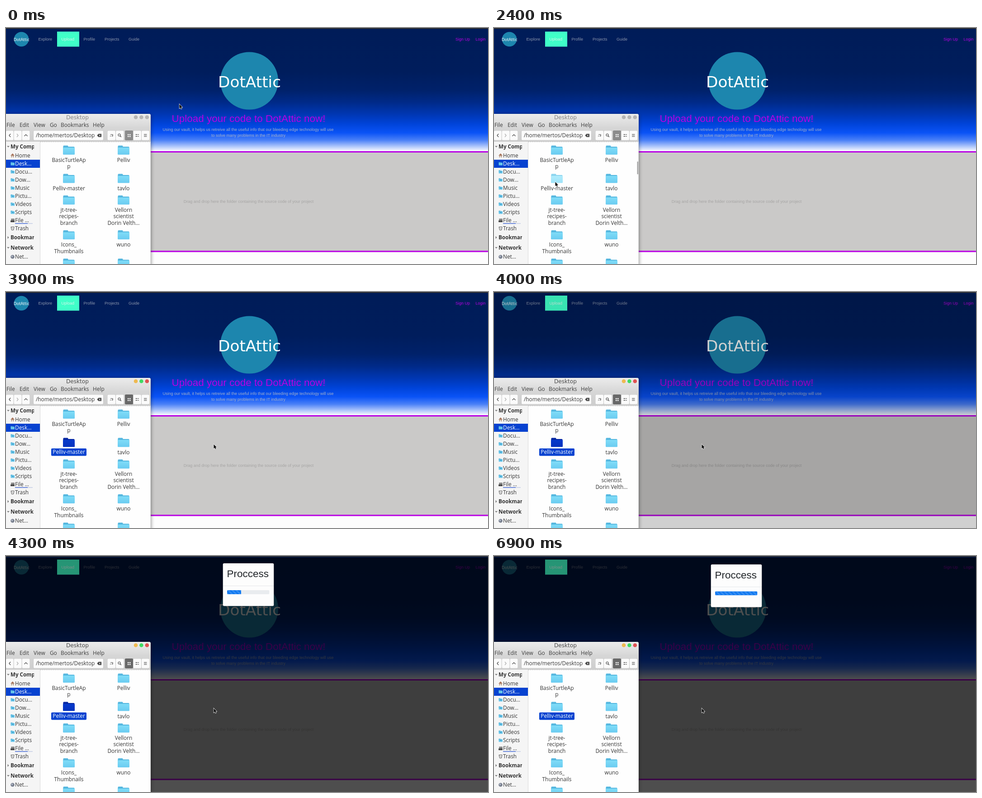
Recreate the animation shown at these times as an HTML page with a canvas. Size 1066x525 px, loop 7 s.

```html
<!DOCTYPE html>
<html lang="en">
<head>
<meta charset="utf-8">
<title>Folder upload</title>
<style>
  html, body { margin: 0; width: 100%; height: 100%; overflow: hidden; }
  canvas { display: block; }
</style>
</head>
<body>
<canvas id="stage" width="1066" height="525"></canvas>
<script>
const ctx = document.getElementById('stage').getContext('2d');
const LOOP = 7000, STEP = 100;
const WEB = '"Liberation Sans", Arial, sans-serif';
const UI = '"Open Sans", sans-serif';
const TITLE = '"DejaVu Sans", sans-serif';
const BODY_FONT = `9px ${WEB}`, HEADING_FONT = `22.5px ${WEB}`, UI_FONT = `11.85px ${UI}`;
const PURPLE = '#b900e4', BLUE = '#0742d0', LOGO = '#1d86ae';

// Linear interpolation through [time, value] pairs.
function track(t, keys) {
  if (t <= keys[0][0]) return keys[0][1];
  for (let i = 1; i < keys.length; i++) {
    const [t0, a] = keys[i - 1], [t1, b] = keys[i];
    if (t <= t1) return a + (b - a) * (t - t0) / (t1 - t0);
  }
  return keys[keys.length - 1][1];
}

function rect(x, y, w, h, color, r = 0) {
  ctx.fillStyle = color;
  ctx.beginPath();
  ctx.roundRect(x, y, w, h, r);
  ctx.fill();
}

function circle(x, y, r, color) {
  ctx.fillStyle = color;
  ctx.beginPath();
  ctx.arc(x, y, r, 0, Math.PI * 2);
  ctx.fill();
}

function poly(points, color, stroke) {
  ctx.beginPath();
  points.forEach(([x, y]) => ctx.lineTo(x, y));
  ctx.closePath();
  if (stroke) {
    ctx.strokeStyle = stroke;
    ctx.lineWidth = 1.4;
    ctx.stroke();
  }
  ctx.fillStyle = color;
  ctx.fill();
}

function line(points, color, width = 1) {
  ctx.beginPath();
  points.forEach(([x, y]) => ctx.lineTo(x, y));
  ctx.strokeStyle = color;
  ctx.lineWidth = width;
  ctx.stroke();
}

function text(str, x, y, font, color, align = 'left') {
  ctx.font = font;
  ctx.fillStyle = color;
  ctx.textAlign = align;
  ctx.fillText(str, x, y);
}

function vertical(y0, y1, stops) {
  const g = ctx.createLinearGradient(0, y0, 0, y1);
  stops.forEach(([at, color]) => g.addColorStop(at, color));
  return g;
}

function logo(x, y, r, size, baseline) {
  circle(x, y, r, LOGO);
  text('DotAttic', x + 0.5, baseline, `${size}px ${TITLE}`, '#fff', 'center');
}

const sky = vertical(2, 274, [
  [0, '#001c58'], [0.35, '#001d5c'], [0.5, '#00216a'], [0.6, '#002a88'], [0.7, '#0037b4'],
  [0.78, '#0044da'], [0.85, '#0a53f6'], [0.91, '#4a80f7'], [1, '#fafbfe'],
]);

function drawPage() {
  rect(0, 0, 1066, 525, '#fdfdfd');
  rect(0, 0, 1066, 274, sky);
  rect(0, 0, 1066, 2, '#303134');
  rect(0, 274, 1066, 224.5, PURPLE);
  rect(0, 277, 1066, 218.5, '#cac9c8');

  logo(34, 25, 16.3, 8.6, 28.5);
  rect(113, 8, 49, 33.5, '#40ffc8');
  [['Explore', 71.5], ['Upload', 122.5], ['Profile', 171.5], ['Projects', 218], ['Guide', 271]]
    .forEach(([label, x]) => text(label, x, 28, BODY_FONT, label === 'Upload' ? '#d2f5ea' : '#8b95ac'));
  text('Sign Up', 994, 28, BODY_FONT, PURPLE);
  text('Login', 1060.5, 28, BODY_FONT, PURPLE, 'right');

  logo(538, 117.5, 64, 34.3, 132);
  text('Upload your code to DotAttic now!', 366.4, 209, HEADING_FONT, PURPLE);
  text('Using our vault, it helps us retreive all the useful info that our bleeding edge technology will use',
    535.5, 228.5, BODY_FONT, '#a4b0c8', 'center');
  text('to solve many problems in the IT industry', 536, 242, BODY_FONT, '#a4b0c8', 'center');
  text('Drag and drop here the folder containing the source code of your project',
    536.5, 389, BODY_FONT, '#a6a5a4', 'center');
}

function drawBackdrop(t) {
  const alpha = track(t, [[3900, 0], [4000, 0.18], [4100, 0.46], [4200, 0.62], [4300, 0.69]]);
  if (!alpha) return;
  ctx.fillStyle = `rgba(0,0,0,${alpha})`;
  ctx.beginPath();
  ctx.rect(0, 3, 1066, 522);
  ctx.rect(113, 8, 49, 33.5);
  ctx.fill('evenodd');
  rect(113, 8, 49, 33.5, `rgba(0,0,0,${alpha * 0.6})`);
}

function drawModal(t) {
  if (t < 4200) return;
  ctx.save();
  ctx.globalAlpha = track(t, [[4200, 0.5], [4300, 1]]);
  ctx.translate(480, track(t, [[4200, 8], [4300, 16.5], [4400, 19]]));
  rect(-0.5, -0.5, 113, 95.5, '#8d8d90', 3);
  rect(0, 0, 112, 94.5, '#fdfdfd', 2.5);
  text('Proccess', 8.5, 30.5, HEADING_FONT, '#212529');
  rect(0, 49.5, 112, 0.8, '#dcdfe3');

  ctx.beginPath();
  ctx.roundRect(9, 59.5, 93.5, 9, 2.2);
  ctx.clip();
  rect(9, 59.5, 93.5, 9, '#e9ecef');
  const width = track(t, [[4600, 31], [5900, 93.5]]);
  rect(9, 59.5, width, 9, '#0f78f0');
  ctx.beginPath();
  ctx.rect(9, 59.5, width, 9);
  ctx.clip();
  for (let x = 0; x < 105; x += 9)
    poly([[x, 59.5], [x + 4.5, 59.5], [x + 13.5, 68.5], [x + 9, 68.5]], '#338cf3');
  ctx.restore();
}

function folder(x, y, tone = 'normal') {
  const [back, top, bottom] = {
    normal: ['#55b7df', '#7fdcf8', '#6acbf0'],
    hover: ['#8cd4ee', '#b0ecfc', '#9ee2f8'],
    selected: ['#0527a2', '#0639cc', '#0531bd'],
  }[tone];
  rect(x - 12.5, y + 0.5, 11, 8, back, 1.5);
  rect(x - 12.5, y + 3, 25, 10, back, 1.5);
  rect(x - 13, y + 5, 26, 15.8, vertical(y + 5, y + 21, [[0, top], [1, bottom]]), 1.5);
}

const FOLDERS = [
  [139, 261, 'BasicTurtleAp', 'p'],
  [260, 261, 'Pelliv'],
  [139, 324, 'Pelliv-master'],
  [260, 324, 'tavlo'],
  [139, 372, 'jt-tree-', 'recipes-', 'branch'],
  [260, 372, 'Vellorn', 'scientist', 'Dorin Velth…'],
  [139, 449.5, 'Icons_', 'Thumbnails'],
  [260, 449.5, 'wuno'],
  [139, 512.5],
  [260, 512.5],
];
const PICKED = FOLDERS[2];

function selectedLabel(x, y) {
  rect(x - 39, y, 78, 16.5, BLUE, 2);
  text(PICKED[2], x, y + 12.3, UI_FONT, '#fff', 'center');
}

function drawFolders(t, cursor) {
  const selected = t >= 2500;
  for (const item of FOLDERS) {
    const [x, y, ...lines] = item;
    const isPicked = item === PICKED && selected;
    const hover = !selected && Math.abs(cursor.x - x) < 13 && cursor.y > y && cursor.y < y + 21;
    folder(x, y, isPicked && t < 6900 ? 'selected' : hover ? 'hover' : 'normal');
    if (isPicked) selectedLabel(x, 348);
    else lines.forEach((str, i) =>
      text(str, x, y + 36.5 + i * 14.7, UI_FONT, '#333', 'center'));
  }
}

const PLACES = [
  ['Home', 284], ['Desk…', 302], ['Docu…', 320], ['Dow…', 338], ['Music', 356], ['Pictu…', 374],
  ['Videos', 392], ['Scripts', 410], ['File …', 428], ['Trash', 446], ['Net…', 509],
];

function placeIcon(name, y) {
  if (name === 'Home') {
    poly([[10, y], [14.5, y - 5], [19, y]], '#a66f55');
    rect(11.5, y - 1, 6, 5, '#b79a86');
    rect(13.5, y + 1, 2, 3, '#fff');
  } else if (name === 'File …') {
    rect(11, y - 4, 8, 4, '#8b8b8b', 1);
    rect(10, y, 9, 4, '#4b4b4b', 1);
  } else if (name === 'Trash') {
    line([[11, y - 3.5], [18, y - 3.5], [16.5, y + 3.5], [12.5, y + 3.5], [11, y - 3.5]], '#555');
    line([[13, y - 1.5], [16, y + 1.5]], '#555');
  } else if (name === 'Net…') {
    circle(14.5, y, 4.3, '#7b8291');
    circle(13.5, y - 1, 1.8, '#b4bccb');
  } else {
    rect(10.5, y - 3.5, 4, 3, '#45a5cf');
    rect(10.5, y - 2.5, 8.5, 6, '#67c5ea', 0.5);
    if (name !== 'Desk…') rect(13, y - 0.5, 3.5, 1.5, '#3a93bb');
  }
}

function drawSidebar() {
  rect(0, 253, 75, 272, '#f5f5f5');
  rect(75, 253, 1, 272, '#d9d9d9');
  rect(0, 293, 75, 18, BLUE);
  for (const [name, y] of PLACES) {
    placeIcon(name, y);
    text(name, 20, y + 4.3, UI_FONT, name === 'Desk…' ? '#fff' : '#333');
  }
  rect(20, 434.3, 39, 1.2, '#b9c4e2');
  rect(20, 434.3, 28, 1.2, '#2c55d0');

  ctx.save();
  ctx.beginPath();
  ctx.rect(0, 253, 62, 272);
  ctx.clip();
  [['My Computer', 264], ['Bookmarks', 466], ['Network', 489]].forEach(([name, y]) => {
    text(name, 10, y + 4.3, `bold 11.6px ${UI}`, '#333');
    poly(name === 'Bookmarks'
      ? [[3.5, y - 3], [6.5, y], [3.5, y + 3]]
      : [[2, y - 1.5], [8, y - 1.5], [5, y + 1.5]], '#777');
  });
  ctx.restore();
}

function drawToolbar(focused) {
  [[0, 16.5], [17.5, 17], [35.5, 17], [61, 154], [224.5, 17.5], [243, 17.5], [281.5, 17.5], [300, 17]]
    .forEach(([x, w]) => {
      rect(x - 0.5, 228, w + 1, 22, '#c3c3c3', 2.5);
      rect(x, 228.5, w, 21, '#fbfbfb', 2);
    });
  rect(263, 228, 18, 22, focused ? '#686868' : '#8c8c8c', 2);
  line([[10, 235.5], [7, 239], [10, 242.5]], '#444', 1.2);
  line([[24, 235.5], [27, 239], [24, 242.5]], '#aaa', 1.2);
  line([[40.5, 240.5], [44, 237], [47.5, 240.5]], '#444', 1.2);
  text('/home/mertos/Desktop', 66, 243, UI_FONT, '#383838');

  poly([[201.5, 239], [204.5, 235.5], [211, 235.5], [211, 242.5], [204.5, 242.5]], '#3d3d3d');
  line([[205.5, 237.3], [209, 240.8]], '#fff');
  line([[209, 237.3], [205.5, 240.8]], '#fff');

  line([[230, 240.5], [232, 240.5]], '#444', 1.2);
  line([[231, 237], [236, 237], [236, 240.5], [233.5, 240.5]], '#444', 1.1);
  ctx.beginPath();
  ctx.arc(250.5, 238, 2.5, 0, Math.PI * 2);
  ctx.stroke();
  line([[252.3, 240], [254.8, 242.5]], '#444', 1.4);
  for (const y of [236, 240]) {
    rect(269, y, 2.5, 2.5, '#fff');
    rect(273, y, 2.5, 2.5, '#fff');
    rect(287, y, 2, 2, '#444');
    rect(290, y + 0.5, 4, 1, '#444');
  }
  for (const y of [236, 238.5, 241]) rect(305, y, 6.5, 1, '#555');
}

function drawWindow(t, cursor) {
  const focused = t >= 2500;
  ctx.save();
  ctx.shadowColor = 'rgba(0,0,0,.5)';
  ctx.shadowBlur = 8;
  ctx.shadowOffsetY = 1;
  rect(-6, 191, 326, 340, '#e6e6e6', 4);
  ctx.restore();
  rect(-6, 191, 326, 62, vertical(191, 253, [[0, '#ececec'], [0.5, '#d6d6d6'], [1, '#cdcdcd']]), [4, 4, 0, 0]);
  text('Desktop', 158, 203, `12.1px ${TITLE}`, focused ? '#4a4a4a' : '#878787', 'center');
  const lights = focused ? ['#efb950', '#3edb62', '#df5252'] : ['#b4b4b4', '#b4b4b4', '#b4b4b4'];
  lights.forEach((color, i) => circle(287 + i * 12.4, 198.5, 4.3, color));
  [['File', 1], ['Edit', 30], ['View', 61], ['Go', 97], ['Bookmarks', 121], ['Help', 192]]
    .forEach(([name, x]) => text(name, x, 220, UI_FONT, '#3d3d3d'));
  drawToolbar(focused);

  rect(76, 253, 243, 272, '#fefefe');
  ctx.setLineDash([2, 2]);
  line([[76, 253.5], [319, 253.5]], '#c8c8c8');
  ctx.setLineDash([]);
  drawSidebar();
  drawFolders(t, cursor);

  const bar = t < 1200 || t >= 3900 ? 0 : track(t, [[2500, 1], [3100, 0.3]]);
  if (bar) rect(316.5, 297, 2.5, 28.5, `rgba(165,165,165,${bar})`, 1);
}

function drawDrag(x) {
  ctx.globalAlpha = 0.92;
  folder(x, 323);
  ctx.globalAlpha = 1;
  selectedLabel(x, 347);
  // Grabbing hand
  rect(x - 17, 339.5, 9, 5.5, '#111', 2.5);
  rect(x - 14, 337.5, 6, 8, '#111', 2);
  circle(x - 9, 344, 3, '#f4f4f4');
  line([[x - 9, 342.2], [x - 9, 345.8]], '#111', 1);
  line([[x - 10.8, 344], [x - 7.2, 344]], '#111', 1);
}

function drawArrow({ x, y }) {
  const shape = [[0, 0], [0, 9.2], [2.1, 7.4], [3.6, 10.6], [5.2, 9.9], [3.8, 6.8], [6.4, 6.6]];
  poly(shape.map(([dx, dy]) => [x + 0.5 + dx, y + 0.5 + dy]), '#0c0c0c', '#f2f2f2');
}

function cursorAt(t) {
  if (t >= 3900) return { x: 459, y: 338.5 };
  return {
    x: track(t, [[500, 383], [1200, 262], [1600, 134], [1900, 134], [2000, 135]]),
    y: track(t, [[500, 169], [1200, 272], [1600, 340], [1900, 340], [2000, 342]]),
  };
}

function frame() {
  const t = Math.floor(performance.now() % LOOP / STEP) * STEP;
  const cursor = cursorAt(t);
  drawPage();
  drawBackdrop(t);
  drawModal(t);
  drawWindow(t, cursor);
  if (t >= 2600 && t < 3900) drawDrag(track(t, [[2500, 139], [3100, 411], [3500, 463]]));
  else drawArrow(cursor);
  requestAnimationFrame(frame);
}
frame();
</script>
</body>
</html>
```
